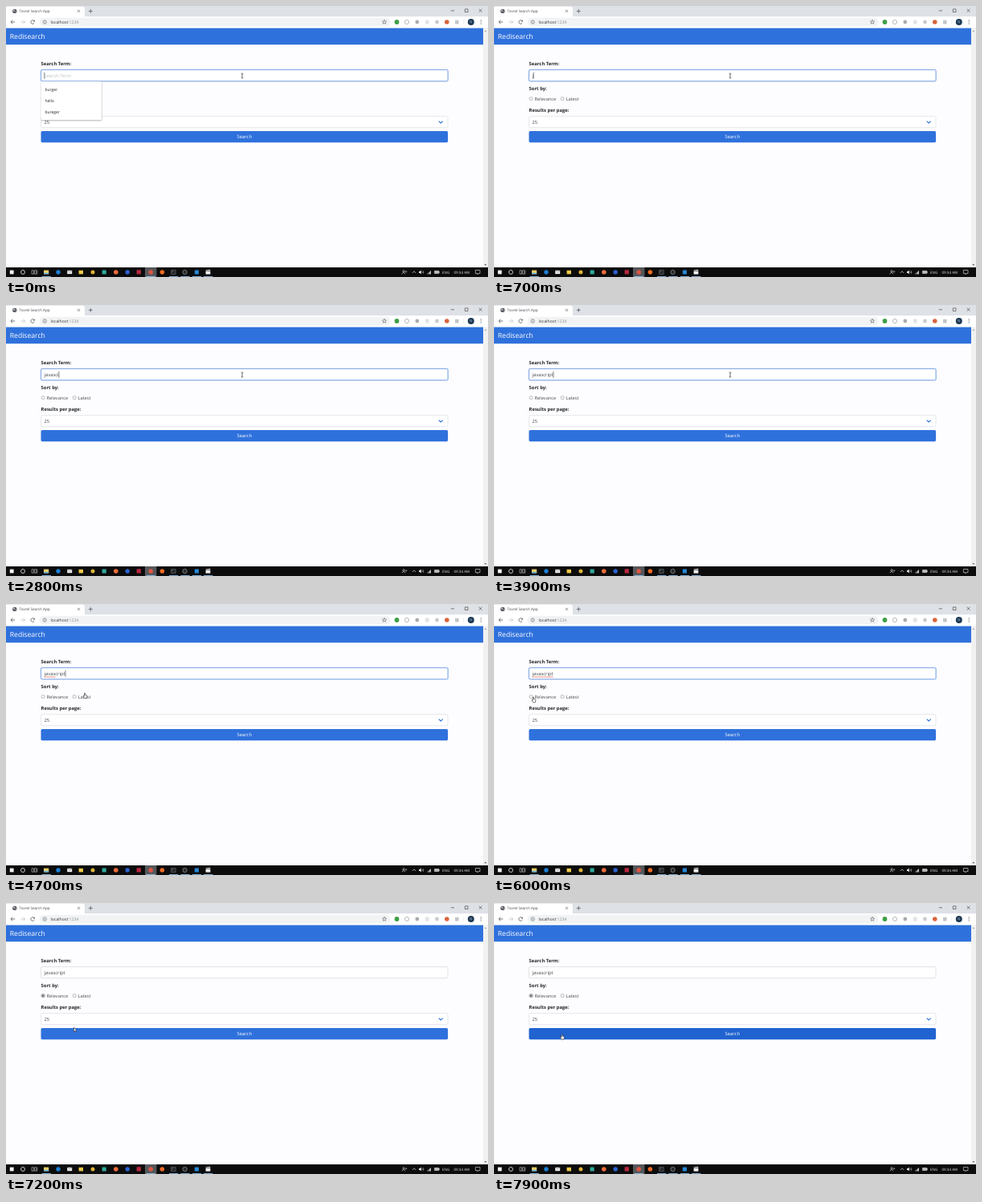
Recreate the animation shown at these times as an HTML page with a canvas. Size 600 by 338 pixels, loop 8 s.

```html
<!DOCTYPE html>
<html lang="en">
<head>
<meta charset="utf-8">
<title>Search form</title>
<style>
html, body { margin: 0; width: 100%; height: 100%; overflow: hidden; background: #fdfcfe; }
canvas { display: block; width: 600px; height: 338px; }
</style>
</head>
<body>
<canvas id="stage"></canvas>
<script>
const W = 600, H = 338, LOOP = 8000;
const canvas = document.getElementById('stage');
const dpr = window.devicePixelRatio || 1;
canvas.width = W * dpr;
canvas.height = H * dpr;
const ctx = canvas.getContext('2d');
const FONT = '"Open Sans", "Noto Sans", sans-serif';
const BLUE = '#2f71dc', BLUE_DARK = '#2063d0';

// [time, text in the search box]
const TYPING = [
  [0, ''], [200, 'j'], [1000, 'ja'], [1400, 'jav'], [1900, 'java'], [2300, 'javas'],
  [2500, 'javasc'], [2700, 'javasci'], [3300, 'javasc'], [3400, 'javascr'],
  [3500, 'javascri'], [3700, 'javascrip'], [3900, 'javascript']
];
// [time, x, y] of the pointer tip
const PATH = [
  [0, 294, 87], [4050, 294, 87], [4700, 98, 111], [4950, 98, 111], [5500, 65, 116],
  [5780, 65, 116], [6000, 49, 116], [6650, 49, 116], [7200, 84.5, 155.2],
  [7400, 84.5, 160], [7600, 84.5, 163.6], [8000, 84.5, 163.6]
];
const CLICK = 6200, HOVER = 7300;

const clamp = v => Math.max(0, Math.min(1, v));
const ease = u => u * u * (3 - 2 * u);

function typedAt(t) {
  return TYPING.filter(k => k[0] <= t).pop()[1];
}

function pointerAt(t) {
  let i = 1;
  while (i < PATH.length - 1 && PATH[i][0] < t) i++;
  const [t0, x0, y0] = PATH[i - 1], [t1, x1, y1] = PATH[i];
  const u = ease(clamp((t - t0) / (t1 - t0)));
  return [x0 + (x1 - x0) * u, y0 + (y1 - y0) * u];
}

function rect(x, y, w, h, fill) {
  ctx.fillStyle = fill;
  ctx.fillRect(x, y, w, h);
}

function box(x, y, w, h, r, fill, stroke, lw = 0.6) {
  ctx.beginPath();
  ctx.roundRect(x, y, w, h, r);
  paint(fill, stroke, lw);
}

function disc(x, y, r, fill, stroke, lw = 0.6) {
  ctx.beginPath();
  ctx.arc(x, y, r, 0, 7);
  paint(fill, stroke, lw);
}

function paint(fill, stroke, lw) {
  if (fill) { ctx.fillStyle = fill; ctx.fill(); }
  if (stroke) { ctx.strokeStyle = stroke; ctx.lineWidth = lw; ctx.stroke(); }
}

function shape(pts, fill, stroke, lw = 0.8, close = !!fill) {
  ctx.beginPath();
  for (let i = 0; i < pts.length; i += 2) ctx.lineTo(pts[i], pts[i + 1]);
  if (close) ctx.closePath();
  paint(fill, stroke, lw);
}

const line = (x0, y0, x1, y1, color, lw = 0.7) => shape([x0, y0, x1, y1], null, color, lw);

function text(s, x, y, size, color = '#333', weight = 400, align = 'left') {
  ctx.font = `${weight} ${size}px ${FONT}`;
  ctx.fillStyle = color;
  ctx.textAlign = align;
  ctx.fillText(s, x, y);
  return ctx.measureText(s).width;
}

function cross(x, y, r, color, lw = 0.7) {
  line(x - r, y - r, x + r, y + r, color, lw);
  line(x - r, y + r, x + r, y - r, color, lw);
}

function arc(x, y, r, a, b, color, lw = 0.8) {
  ctx.beginPath();
  ctx.arc(x, y, r, a, b);
  paint(null, color, lw);
}

function drawBrowser() {
  rect(0, 0, W, 13.5, '#dee1e6');
  box(-4, 0.8, 102, 18, 3, '#fff');
  rect(0, 13.2, W, 14.6, '#fff');
  disc(10.8, 6.4, 2.7, '#55595e');
  shape([9, 5, 11, 4.6, 10.4, 6.4, 9.2, 6.8], '#cfd2d6');
  shape([11.5, 6.6, 12.8, 6.4, 12, 8.2], '#cfd2d6');
  text('Tovrel Search App', 16.5, 8.2, 4.6, '#45494d');
  cross(90.5, 6.4, 1.5, '#5f6368');
  line(102.8, 6.4, 107.8, 6.4, '#4d5156');
  line(105.3, 3.9, 105.3, 8.9, '#4d5156');

  line(553.8, 5.8, 558, 5.8, '#333', 0.6);
  ctx.beginPath();
  ctx.rect(571.4, 3.9, 3.6, 3.6);
  paint(null, '#333', 0.6);
  cross(590.6, 5.7, 1.9, '#333', 0.6);

  for (const [x, dir, color] of [[8.6, -1, '#55595e'], [21, 1, '#bfc2c6']]) {
    line(x - 2.6, 20, x + 2.6, 20, color, 0.8);
    shape([x + dir * 0.3, 17.6, x + dir * 2.7, 20, x + dir * 0.3, 22.4], null, color);
  }
  arc(33.2, 20, 2.3, 0.5, 5.6, '#55595e');
  shape([35.9, 17.2, 35.9, 19.6, 33.5, 19.6], '#55595e');

  box(41.5, 14.8, 437, 10.4, 5.2, '#f1f3f4');
  disc(48.2, 20, 2.2, null, '#5f6368', 0.6);
  line(48.2, 19.7, 48.2, 21.3, '#5f6368', 0.6);
  rect(47.9, 18.5, 0.6, 0.6, '#5f6368');
  const w = text('localhost', 55.5, 21.8, 5.2, '#333');
  text(':1234', 55.5 + w, 21.8, 5.2, '#8c9094');

  const star = [];
  for (let i = 0; i < 10; i++) {
    const a = i * Math.PI / 5 - Math.PI / 2, r = i % 2 ? 1.2 : 2.8;
    star.push(471 + r * Math.cos(a), 20 + r * Math.sin(a));
  }
  shape(star, null, '#5f6368', 0.6, true);

  disc(486.5, 20, 2.9, '#3fa047');
  disc(499, 20, 2.6, null, '#9a9da0', 0.7);
  disc(511.8, 20, 2.4, '#a9acb0');
  box(521.8, 17.6, 4.8, 4.8, 0.5, '#e2e3e5');
  disc(536.5, 20, 2.4, '#c8cacd');
  disc(548.8, 20, 2.8, '#d8643c');
  box(559, 17.8, 4.6, 4.6, 0.5, '#c3c6c9');
  line(569.8, 17, 569.8, 23, '#d5d7da', 0.5);
  disc(578.8, 20, 4, '#1d3a56');
  text('N', 578.8, 21.4, 3.8, '#d8e0e8', 400, 'center');
  for (const y of [17.9, 20, 22.1]) disc(591.2, y, 0.6, '#55595e');
}

function drawScrollbar() {
  rect(594, 27.6, 6, 298.6, '#f1f1f1');
  shape([595.4, 32, 596.9, 30.3, 598.4, 32], '#a3a3a3');
  shape([595.4, 322, 596.9, 323.7, 598.4, 322], '#606060');
}

function radio(x, y, checked) {
  disc(x, y, 2.2, checked ? '#fff' : '#f1f1f1', checked ? '#666' : '#a6a6a6', 0.6);
  if (checked) disc(x, y, 1.2, '#444');
}

function drawForm(t) {
  const focused = t < CLICK;
  text('Search Term:', 43.6, 74.2, 5.87, '#24282c', 700);
  if (focused) box(43.4, 79.3, 506.8, 14.7, 1.8, null, '#bcd2f3', 1.2);
  box(43.6, 79.6, 506.4, 14.1, 1.6, '#fff', focused ? '#5e8fdc' : '#d3d6da', 0.7);

  const value = typedAt(t);
  if (!value) text('Search Term', 47.5, 89.1, 5.8, '#bcc0c4');
  const w = value ? text(value, 47.5, 89.1, 5.9, '#43484d') : 0;
  if (focused) {
    if (t >= 4100) line(47.8, 91, t < 5000 ? 61.5 : 47.5 + w, 91, '#e2604c', 0.7);
    const caret = t < 4800 || (t >= 5300 && t < 5800);
    if (caret) line(47.8 + w, 82.6, 47.8 + w, 90.8, '#333', 0.6);
  }

  text('Sort by:', 43.6, 105.4, 5.87, '#24282c', 700);
  radio(46.1, 115.6, t >= CLICK);
  text('Relevance', 50.4, 117.8, 5.75, '#4c5156');
  radio(85.1, 115.6, false);
  text('Latest', 89.4, 117.8, 5.75, '#4c5156');

  text('Results per page:', 43.6, 132, 5.87, '#24282c', 700);
  box(43.6, 137.6, 506.4, 14.1, 1.6, '#fff', '#dcdfe3', 0.7);
  text('25', 47.5, 147, 5.8, '#43484d');
  shape([538.7, 143.6, 541.2, 146, 543.7, 143.6], null, BLUE, 1.2);

  box(43.5, 156, 506.6, 14.3, 1.7, t < HOVER ? BLUE : BLUE_DARK);
  text('Search', 296.8, 165.4, 5.85, '#fff', 400, 'center');
}

function drawSuggestions() {
  ctx.save();
  ctx.shadowColor = 'rgba(0,0,0,.3)';
  ctx.shadowBlur = 2 * dpr;
  ctx.shadowOffsetY = 0.6 * dpr;
  rect(43.6, 94.2, 75.2, 47.8, '#fff');
  ctx.restore();
  ['burger', 'hello', 'bureger'].forEach((s, i) =>
    text(s, 48.4, 105.6 + i * 14.1, 5, '#222'));
}

function drawTaskbar() {
  rect(0, 326, W, 12, '#0c0c0d');
  box(4.8, 329.6, 4.8, 4.8, 0, '#f4f4f4');
  disc(21, 332, 2.5, null, '#eee', 0.8);
  for (const x of [32, 35.4]) {
    ctx.beginPath();
    ctx.rect(x, 329.8, 2.4, 4.4);
    paint(null, '#ccc', 0.6);
  }
  line(38.8, 329.5, 38.8, 334.5, '#ccc', 0.6);

  rect(173, 326, 14.4, 12, '#55575a');
  rect(47, 329.6, 6.2, 4.8, '#f2cf66');
  rect(47, 332.8, 6.2, 1.6, '#62b5e5');
  disc(65, 332, 2.7, '#1d7fd4');
  rect(76.2, 329.8, 6, 4.4, '#f1f1f1');
  shape([76.2, 329.8, 79.2, 332.2, 82.2, 329.8], null, '#444', 0.5);
  rect(90.6, 329.8, 5.4, 4.6, '#f0c94a');
  disc(108, 332, 2.5, '#e0b43b');
  box(119.6, 329.4, 5.2, 5.2, 0.5, '#2fa99a');
  disc(136.8, 332, 2.8, '#ee6c3a');
  disc(151.2, 332, 2.7, '#2b62cf');
  box(162.6, 329.2, 5.4, 5.4, 0.5, '#b5283f');
  disc(180.2, 332, 2.8, '#dd5544');
  disc(194.4, 332, 2.8, '#ee6b24');
  box(205.6, 329.6, 5.6, 4.8, 0, '#202224', '#8b8e90', 0.5);
  line(206.6, 331.2, 208.2, 331.2, '#ccc', 0.5);
  disc(222.6, 332, 2.7, '#28292b', '#a5a7a9', 0.6);
  box(234.8, 329.4, 5.2, 5.2, 0.5, '#2687d3');
  rect(248.6, 330.8, 5.8, 3.8, '#f0f0f0');
  shape([248.6, 329.4, 254.2, 328.8, 254.4, 330.2, 248.8, 330.6], '#d8d8d8');
  for (const x of [44.6, 174.4, 203, 217.3, 231.8, 246])
    rect(x, 337.1, 11.4, 0.9, '#8fbde6');

  const tray = '#e6e6e6';
  disc(495, 330.8, 1.1, null, tray, 0.6);
  arc(495, 334.6, 2, 3.3, 6.1, tray, 0.6);
  disc(498, 331.4, 0.8, null, tray, 0.5);
  shape([505.8, 333, 508, 330.8, 510.2, 333], null, tray, 0.7);
  shape([514, 331, 515.2, 331, 516.8, 329.6, 516.8, 334.4, 515.2, 333, 514, 333], tray);
  for (const r of [1.4, 2.8]) arc(517, 332, r, -0.8, 0.8, tray, 0.5);
  for (let i = 0; i < 4; i++) rect(524.6 + i * 1.2, 333.3 - i, 0.8, 1.2 + i, tray);
  ctx.beginPath();
  ctx.rect(533.4, 330.4, 5.4, 3.2);
  paint('#bbb', tray, 0.5);
  rect(539, 331.3, 0.7, 1.4, tray);
  text('ENG', 543, 333.7, 4.5, '#eee');
  text('09:34 AM', 557.5, 333.7, 4.5, '#eee');
  shape([584.4, 329.5, 590, 329.5, 590, 333.6, 588, 333.6, 586.8, 335, 586.8, 333.6, 584.4, 333.6],
    null, tray, 0.6, true);
}

function drawPointer(x, y) {
  ctx.save();
  ctx.translate(x, y);
  const overInput = y > 79 && y < 94;
  const overButton = y > 156;
  const overLabels = y > 110.5 && y < 121 && x < 106;
  if (overInput) {
    line(0, -2.6, 0, 2.6, '#222', 0.7);
    line(-1.3, -2.8, 1.3, -2.8, '#222', 0.6);
    line(-1.3, 2.8, 1.3, 2.8, '#222', 0.6);
  } else if (overButton || overLabels) {
    shape([-0.5, 0.2, 0.5, 0.2, 0.6, 2.3, 2.6, 2.8, 2.9, 3.6, 2.5, 6.6,
      -0.4, 6.6, -2, 4.1, -1.7, 3.5, -0.5, 4], '#fff', '#2a2a2a', 0.6);
  } else {
    shape([0, 0, 0, 5.2, 1.2, 4.2, 2, 6, 2.8, 5.6, 2, 3.9, 3.6, 3.8], '#fff', '#222', 0.6);
  }
  ctx.restore();
}

function draw(t) {
  ctx.setTransform(dpr, 0, 0, dpr, 0, 0);
  ctx.textRendering = 'geometricPrecision';
  rect(0, 0, W, H, '#fdfcfe');
  drawBrowser();
  rect(0, 27.6, 594, 20.6, BLUE);
  text('Redisearch', 4.8, 41.3, 8.6, '#fff');
  drawScrollbar();
  drawForm(t);
  if (!typedAt(t)) drawSuggestions();
  drawTaskbar();
  drawPointer(...pointerAt(t));
}

const start = performance.now();
function tick() {
  draw((performance.now() - start) % LOOP);
  requestAnimationFrame(tick);
}
tick();
</script>
</body>
</html>
```
